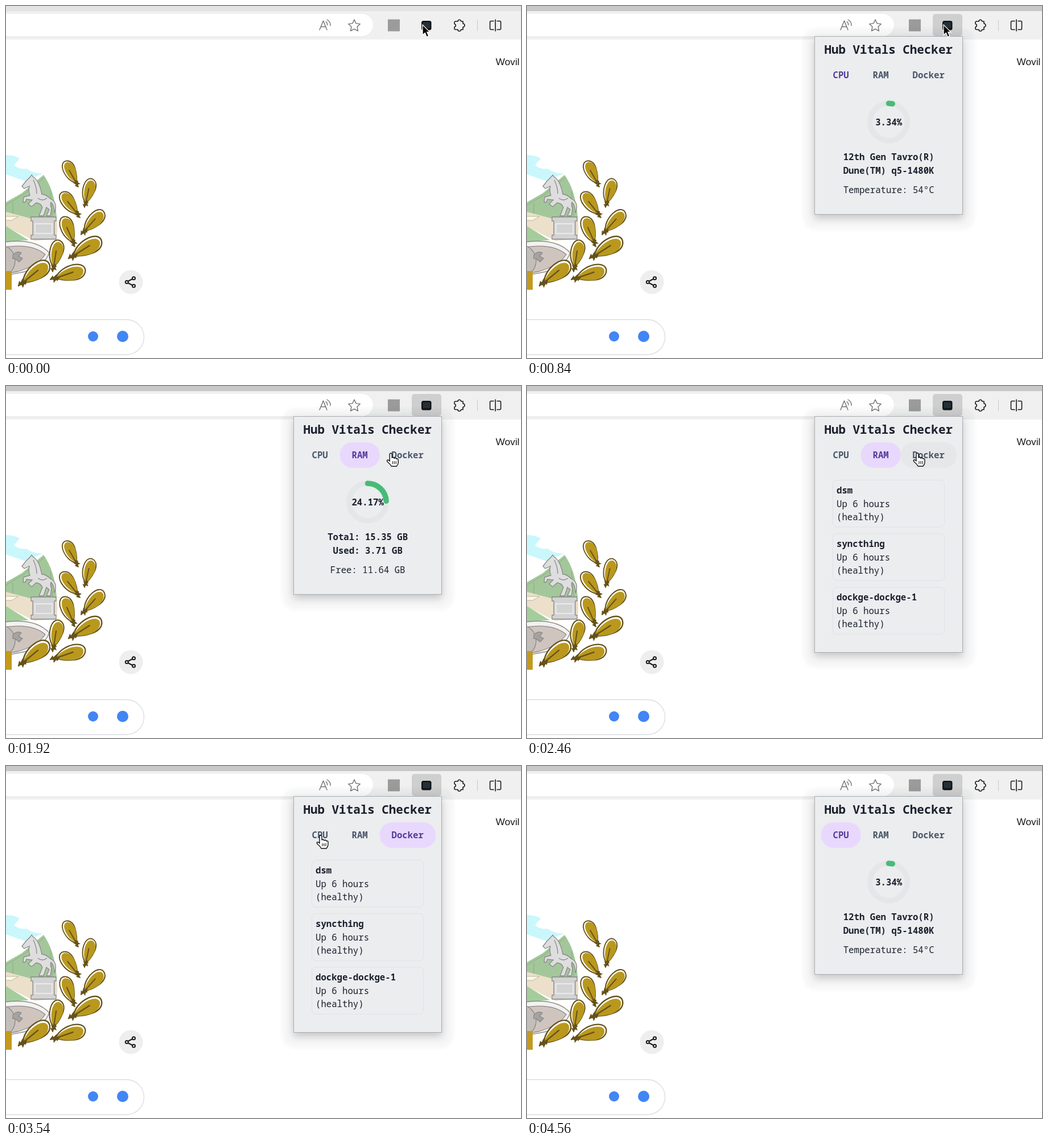
Recreate the animation shown at these times as an HTML page. Size 905x619 px, loop 4620 ms.

```html
<!DOCTYPE html>
<html lang="en">
<head>
<meta charset="utf-8">
<style>
  html, body { margin: 0; width: 100%; height: 100%; overflow: hidden; background: #fff; }
  svg { display: block; }
  .line { fill: none; stroke: #1b1b1b; stroke-width: 1.6; stroke-linejoin: round; stroke-linecap: round; }
  .dim { stroke: #707070; stroke-width: 1.4; }
  .mono { font: 15.68px "Noto Sans Mono", monospace; fill: #1a202c; white-space: pre; }
  .bold { font-weight: 700; }
  .title { font-size: 20.88px; }
  #halo { fill: #1a2a3a; opacity: .035; filter: blur(3px); }
  #card { fill: #ebedef; stroke: #a9adb1; filter: drop-shadow(0 6px 7px #0003); }
  .box { fill: none; stroke: #dfe3e7; }
</style>
</head>
<body>
<svg width="905" height="619" viewBox="0 0 905 619">
  <!-- browser toolbar -->
  <rect id="strip" width="905" height="10"/>
  <rect y="9" width="905" height="50" fill="#f0f0f0"/>
  <rect x="-40" y="14.5" width="685" height="40" rx="20" fill="#e2e2e2"/>
  <rect x="-40" y="14" width="685" height="39.5" rx="19.7" fill="#fff"/>
  <path class="line dim" d="M551 42 557.5 26 564 42M553.4 36.500H561.600M562 27.500q3 2 2.600 6M564 24q6.500 3.500 6 10.500"/>
  <path class="line dim" d="M612 24l3.100 6.600 7.200 1-5.200 5 1.300 7.200-6.400-3.400-6.400 3.400 1.300-7.200-5.200-5 7.200-1z"/>
  <rect x="671" y="23.5" width="21" height="21" fill="#9b9b9b"/>
  <rect id="pressed" x="713" y="14" width="52" height="39" rx="5" fill="#cfcfcf"/>
  <rect x="730" y="26" width="17.5" height="16.5" rx="3.5" fill="#101416"/>
  <rect x="732.5" y="28.5" width="12.5" height="10.5" rx="1.5" fill="#253036"/>
  <path class="line" d="M790 27h4a2.800 2.800 0 0 1 5.600 0h3.400v4a2.800 2.800 0 0 1 0 6v4.500h-3.400a2.800 2.800 0 0 1-5.600 0h-4q-2 0-2-2v-2.500a2.800 2.800 0 0 0 0-5.500V29q0-2 2-2z"/>
  <path d="M828.5 24v20" stroke="#c9c9c9"/>
  <path class="line" d="M857 26.500h-4.500a2 2 0 0 0-2 2v11a2 2 0 0 0 2 2H857M863 26.500h4.500a2 2 0 0 1 2 2v11a2 2 0 0 1-2 2H863M860 24v20"/>
  <text x="860.5" y="104" font-family="Liberation Sans, Arial, sans-serif" font-size="17.3" fill="#1b1b1b">Wovil</text>

  <!-- garden illustration -->
  <path fill="#c9f7fc" d="M0 262q14 0 24 6l-10 12q10 8 22 6 14 10 30 8L34 308 0 296z"/>
  <path fill="#a3c79a" d="M0 345 28 329 66 297Q86 325 89 372L45 376 0 368z"/>
  <path fill="none" stroke="#87ad80" d="M0 350 30 332 68 301M78 325l4 46M12 346v20"/>
  <path fill="#ece0cb" d="M0 362 45 374 89 372Q92 395 88 410L50 413 0 388z"/>
  <path fill="#fff7e4" stroke="#b5b7a0" d="M-2 370H22L10 377H-2z"/>
  <path fill="#a5cd9c" d="M0 387 40 412Q18 412 0 417z"/>
  <g stroke="#8b8987" stroke-width="1.3">
    <path fill="#f3f2f1" d="M-2 415Q52 408 76 434 68 456 40 466L-2 474z"/>
    <path fill="#cfc5be" d="M-2 424Q46 417 69 437 55 457 20 467L-2 471z"/>
    <circle cx="-12" cy="448" r="28" fill="#c3beba"/>
    <path fill="#a5a3a1" d="M12 438q6-8 15-4l-5 6 7 4-6 6q-6-6-11-6z"/>
    <path fill="#d3d3d4" d="M44 371h44v7h-3v25h3v7H44v-7h3v-25h-3z"/>
    <path fill="none" stroke="#f4f4f4" d="M51 383h30v17H51z"/>
    <path fill="#dededf" d="M43 300 35 308 28 317 32 321 41 317Q39 325 42 333L31 336 30 345H34L36 340 46 341 39 348 45 353 53 346Q61 347 64 354L58 369H66L71 354 76 358 71 369H78L80 356Q77 350 79 345 85 350 85 364 92 346 78 339 70 331 63 331 58 306 48 301L45 297z"/>
    <path fill="none" d="M48 306Q54 318 54 330M56 338Q64 344 72 338"/>
  </g>
  <rect y="466" width="10" height="33" fill="#c39a1d"/>
  <g id="leaves"></g>

  <!-- share button and search field -->
  <circle cx="219.5" cy="485.5" r="21" fill="#eeeeef"/>
  <g class="line" style="stroke-width:2">
    <path d="M214.5 484l7.500-4M214.500 487l7.500 4"/>
    <circle cx="212.3" cy="485.5" r="2.5"/><circle cx="224.5" cy="478.8" r="2.5"/><circle cx="224.5" cy="492.2" r="2.5"/>
  </g>
  <rect x="-60" y="551.5" width="302.5" height="61.5" rx="30.75" fill="#fff" stroke="#dcdde1" stroke-width="1.3"/>
  <circle cx="153" cy="581" r="9" fill="#4285f4"/>
  <circle cx="205" cy="581" r="10" fill="#4285f4"/>

  <g id="popup">
    <rect id="halo" x="485" y="39" width="302" rx="24"/>
    <rect id="card" x="505.5" y="53.5" width="260"/>
    <text class="mono bold title" x="522.5" y="84">Hub Vitals Checker</text>
    <g id="tabs"></g>
    <path id="spinner" class="line" style="stroke-width:2.8;stroke-linecap:butt" d="M0-14.500a14.500 14.500 0 0 1 0 29"/>
    <g id="cpu"></g><g id="ram"></g><g id="docker"></g>
  </g>
  <path id="arrow" d="M0 0V18L4.300 14.300 7.200 21.300 10.700 19.800 7.800 13H13z" stroke="#fff" stroke-width="1.3"/>
  <g id="hand" fill="#fff" stroke="#111" stroke-width="1.4" stroke-linejoin="round">
    <path d="M-2 2a2 2 0 0 1 4 0V8q3-2 4 1 3-2 4 1 3-1 3 2v4q0 4-3 7h-9q-2-4-6-7-3-3-1-4 2-1 4 2z"/>
    <path d="M3 14v5M6 14v5M9 14v5" stroke-width="1.1"/>
  </g>
</svg>
<script>
const $ = id => document.getElementById(id);
const mono = (x, y, text, cls = '') => `<text class="mono ${cls}" x="${x}" y="${y}">${text}</text>`;

// Leaves: stem x, y, then tip x, y
const leaves = [
  [127, 318, 104, 273], [138, 354, 151, 304], [130, 372, 98, 328],
  [132, 402, 171, 361], [121, 423, 101, 371], [110, 444, 167, 411],
  [82, 467, 93, 412], [22, 492, 75, 452], [78, 481, 139, 463]
];
$('leaves').innerHTML = leaves.map(([x, y, tx, ty]) => {
  const angle = Math.atan2(ty - y, tx - x) * 180 / Math.PI;
  const scale = Math.hypot(tx - x, ty - y) / 52;
  return `<g transform="translate(${x} ${y}) rotate(${angle}) scale(${scale})" stroke="#65521a" stroke-width="1.9" stroke-linecap="round">
    <path fill="#fff" d="M8 0C14-8 26-12 38-11 48-10 53-5 52 1 50 9 42 12 32 10 22 8 14 5 8 0z"/>
    <path fill="#b9981d" stroke="none" d="M8 0C14-5 26-9 37-8 46-7 50-3 49 2 47 8 40 11 31 10 22 8 14 5 8 0z"/>
    <path fill="none" d="M0 0Q18 0 34-1"/>
    <path fill="#65521a" stroke="none" d="M0-1 5-5 5-2 11-5 10-1 14 1 9 5 8 3 3 6 4 2z"/></g>`;
}).join('');

const tabs = [
  { id: 'cpu', label: 'CPU', x: 516.7, w: 70 },
  { id: 'ram', label: 'RAM', x: 586.7, w: 70 },
  { id: 'docker', label: 'Docker', x: 656.7, w: 98.5 }
];
$('tabs').innerHTML = tabs.map(({ label, x, w }) =>
  `<rect x="${x}" y="99" width="${w}" height="45" rx="22"/>` + mono(x + 20.8, 127, label, 'bold')).join('');

const gauge = (percent, first, second, third) => `
  <g fill="none" stroke-width="9.5" transform="translate(635.5 204) rotate(-90)">
    <circle r="32.7" stroke="#e5e6e7"/>
    <circle r="32.7" stroke="#48bb78" stroke-linecap="round" pathLength="100" stroke-dasharray="${percent} 100"/>
  </g>` + [[percent + '%', 209.5, 'bold'], [first, 271, 'bold'], [second, 294.5, 'bold'], [third, 329, '']]
  .map(([text, y, cls]) => mono(635.7 - text.length * 4.704, y, text, cls)).join('');

$('cpu').innerHTML = gauge('3.34', '12th Gen Tavro(R)', 'Dune(TM) q5-1480K', 'Temperature: 54°C');
$('ram').innerHTML = gauge('24.17', 'Total: 15.35 GB', 'Used: 3.71 GB', 'Free: 11.64 GB');
$('docker').innerHTML = ['dsm', 'syncthing', 'dockge-dockge-1'].map((name, i) => {
  const y = 165.5 + i * 94.2;
  return `<rect class="box" x="537.5" y="${y}" width="196" height="82.5" rx="7"/>`
    + mono(544, y + 23, name, 'bold') + mono(544, y + 47, 'Up 6 hours') + mono(544, y + 70, '(healthy)');
}).join('');

const LOOP = 4620, STEP = 60, BLUR = 120, OPEN = 300, LOADED = 600;
const clicks = [[1500, 'ram'], [2460, 'docker'], [3600, 'cpu']];
const heights = { spinner: 274, cpu: 313, ram: 313, docker: 415 };
// Pointer moves: start, end, from, to
const moves = [
  [840, 1320, [732, 33], [641, 119]],
  [1500, 2100, [641, 119], [686, 118]],
  [2880, 3360, [686, 118], [553, 122]],
  [3600, 4560, [553, 122], [-29, 608]]
];

function pointerAt(t) {
  const [start, end, from, to] = moves.findLast(m => t >= m[0]) || moves[0];
  const u = Math.min(1, Math.max(0, (t - start) / (end - start)));
  const ease = u * u * (3 - 2 * u);
  return from.map((v, i) => v + (to[i] - v) * ease);
}

const show = (id, on) => $(id).style.display = on ? '' : 'none';

function render(t) {
  $('strip').setAttribute('fill', t < BLUR ? '#e3e3e3' : '#c8c8c8');
  show('pressed', t >= BLUR);
  show('popup', t >= OPEN);

  const click = clicks.findLast(c => t >= c[0]);
  const selected = clicks.findLast(c => t >= c[0] + STEP);
  const view = t < LOADED ? 'spinner' : click ? click[1] : 'cpu';
  for (const id in heights) show(id, id === view);
  $('card').setAttribute('height', heights[view]);
  $('halo').setAttribute('height', heights[view] + 42);
  $('spinner').setAttribute('transform', `translate(636 180.5) rotate(${(t - 360) * 0.8 - 23})`);

  tabs.forEach(({ id }, i) => {
    const [pill, label] = [...$('tabs').children].slice(i * 2);
    const active = id === (selected ? selected[1] : 'cpu');
    const pressing = click !== selected && id === click[1];
    pill.setAttribute('fill', active && selected ? '#e9d8fd' : pressing ? '#e6e7e9' : 'none');
    label.style.fill = active ? '#553c9a' : '#4a5568';
  });

  const [x, y] = pointerAt(t);
  const overTab = x > 517 && x < 755 && y > 105 && y < 144;
  show('hand', overTab);
  show('arrow', !overTab);
  for (const id of ['hand', 'arrow']) $(id).setAttribute('transform', `translate(${x} ${y})`);
}

const origin = performance.now();
function tick() {
  const t = (performance.now() - origin) % LOOP;
  render(Math.floor(t / STEP) * STEP);
  requestAnimationFrame(tick);
}
tick();
</script>
</body>
</html>
```
